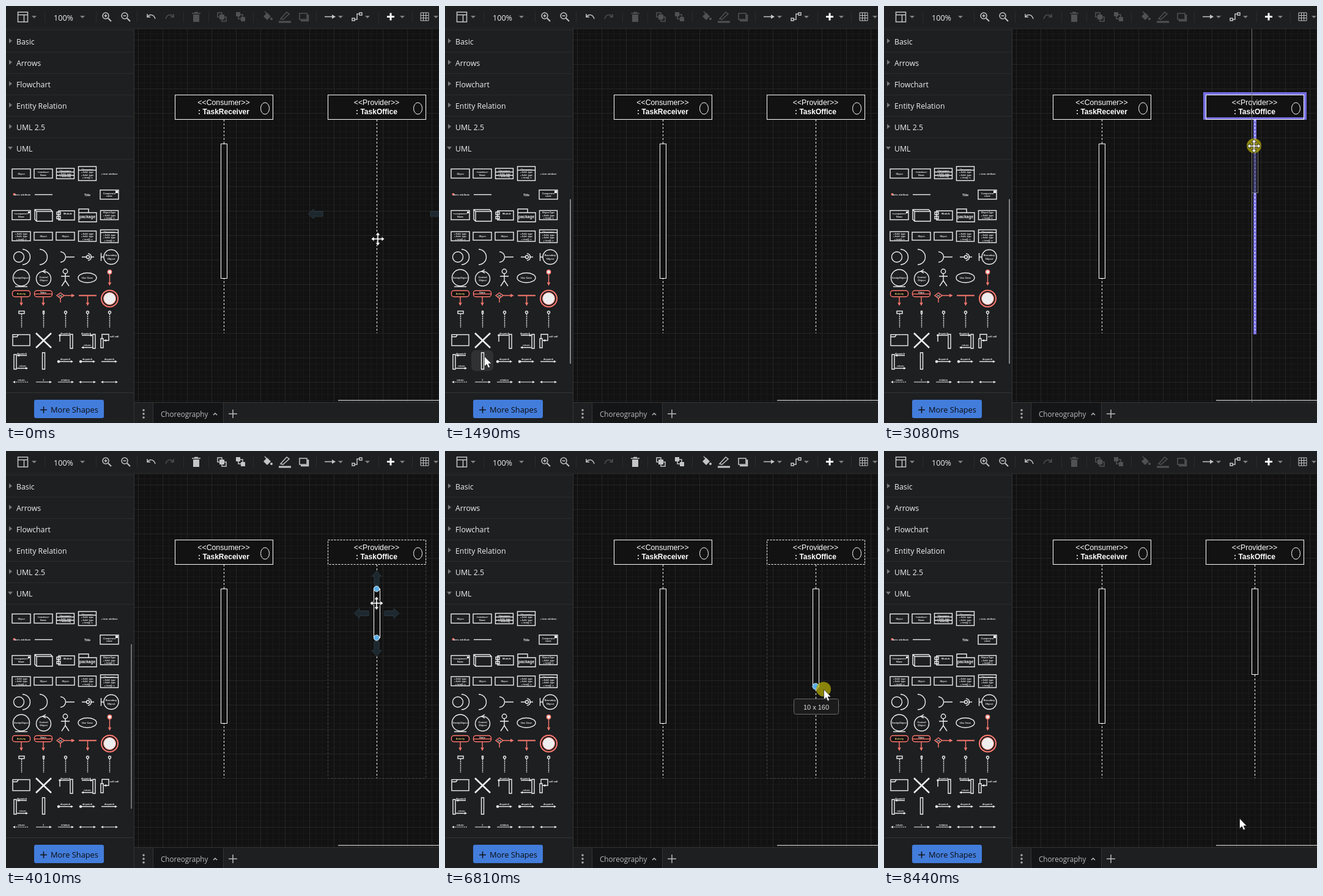
These frames come from a looping animation (708x682 px, 9.38 s). An HTML page:

```html
<!DOCTYPE html>
<html lang="en">
<head>
<meta charset="utf-8">
<style>
html, body { margin: 0; width: 100%; height: 100%; overflow: hidden; background: #121212; }
svg { display: block; }
text { font-family: "Open Sans", "Noto Sans", sans-serif; fill: #f0f0f0; }
.label { font: 12.3px "Liberation Sans", Arial, sans-serif; text-anchor: middle; fill: #fff; }
.tiny { font: bold 4px "Liberation Sans", Arial, sans-serif; text-anchor: middle; }
.icon { fill: none; stroke: #c4c5c6; stroke-width: 1.5; }
.solid { fill: #c4c5c6; stroke: none; }
.shape { fill: none; stroke: #eee; stroke-width: 1.4; }
.red { fill: none; stroke: #ff7a70; stroke-width: 1.4; }
.node { fill: #121212; stroke: #fff; }
</style>
</head>
<body>
<svg id="stage" width="708" height="682" viewBox="0 0 708 682"></svg>
<script>
const LOOP = 9380, STEP = 62;
const rect = (x, y, w, h, a = '') => `<rect x="${x}" y="${y}" width="${w}" height="${h}" ${a}/>`;
const path = (d, a = '') => `<path d="${d}" ${a}/>`;
const circle = (x, y, r, a = '') => `<circle cx="${x}" cy="${y}" r="${r}" ${a}/>`;
const text = (x, y, s, a = '') => `<text x="${x}" y="${y}" ${a}>${s.replace(/</g, '&lt;')}</text>`;
const tiny = (x, y, s, size = 4) => text(x, y, s, `class="tiny" style="font-size:${size}px"`);
const group = (content, a = '') => `<g ${a}>${content}</g>`;
const at = (x, y, content, a = '') => group(content, `transform="translate(${x} ${y})" ${a}`);

function grid() {
  let minor = '', major = '';
  for (let x = 216; x < 708; x += 10) {
    const d = `M${x}.5 37V648`;
    (x - 216) % 40 ? minor += d : major += d;
  }
  for (let y = 45; y < 648; y += 10) {
    const d = `M210 ${y}.5H708`;
    (y - 55) % 40 ? minor += d : major += d;
  }
  return path(minor, 'stroke="#191919"') + path(major, 'stroke="#252525"');
}

const lifeline = x => path(`M${x}.5 186V535`, 'stroke="#fff" stroke-dasharray="3 3"');

function participant(x, role, name, id) {
  const mid = x + 80;
  return rect(x + .5, 145.5, 160, 40, `id="${id}" class="node"`) +
    `<ellipse cx="${x + 147.5}" cy="167.5" rx="7" ry="9.5" fill="none" stroke="#fff"/>` +
    text(mid, 162, `<<${role}>>`, 'class="label"') +
    text(mid, 177, `: ${name}`, 'class="label" style="font-weight:bold;font-size:12px"');
}

const hoverArrow = (x, y, turn = 0) =>
  path('M-12 0L-3-8V-4H12V4H-3V8Z', `transform="translate(${x} ${y}) rotate(${turn})" fill="#1d282e" stroke="#2a3942"`);

function diagram() {
  const bar = (x, h, id) => rect(x + .5, 225.5, 10, h, `id="${id}" class="node"`);
  const highlight =
    rect(524, 143, 165, 41, 'fill="none" stroke="#756ee0" stroke-width="4"') +
    rect(604, 186, 5, 351, 'fill="#756ee0"') +
    rect(526.5, 145.5, 160, 40, 'fill="none" stroke="#fff"');
  return grid() +
    rect(526.5, 145.5, 160, 390, 'id="parent" fill="none" stroke="#4a4a4a" stroke-dasharray="3 3"') +
    participant(276, 'Consumer', 'TaskReceiver', 'left') +
    participant(526, 'Provider', 'TaskOffice', 'right') +
    group(highlight, 'id="highlight"') +
    lifeline(356) + lifeline(606) + bar(351, 220, 'fixedBar') + bar(601, 80, 'bar') +
    path('M601.5 37V648', 'id="guide" stroke="#777"') +
    rect(0, 225.5, 10, 80, 'id="ghost" fill="#121212" fill-opacity=".5" stroke="#7a7a7a"') +
    group(hoverArrow(506, 340) + hoverArrow(706, 340, 180), 'id="hover"') +
    '<g id="selection"></g>' +
    path('M543 645H708', 'stroke="#8a8a8a" stroke-width="2"');
}

function toolbar() {
  const caret = x => path(`M${x - 4} 16h8l-4 4z`, 'fill="#808183"');
  const lens = (x, mark) => at(x, 17, circle(-1, -1, 5) + path('M3 3L8 8', 'stroke-width="2"') + path(mark), 'class="icon"');
  const turn = 'M-6-4V1H-1M-6 1C-2-5 5-3 7 4';
  const front = rect(-7, -6, 7, 7) + rect(0, 1, 7, 7) + rect(-4, -3, 8, 8, 'class="solid"');
  const back = rect(-3, -3, 7, 7) + rect(-7, -7, 7, 7, 'class="solid"') + rect(1, 1, 7, 7, 'class="solid"');
  const editing =
    at(311, 18, rect(-5, -4, 10, 12, 'class="solid"') + path('M-7-6H7M-3-7.5H3')) +
    at(353, 17, front) + at(383, 17, back) +
    at(427, 17, path('M-6 0L0-6L6 0L0 6Z', 'class="solid"') + path('M-4-8L1-3') + circle(7, 4, 2, 'class="solid"')) +
    at(456, 17, path('M-7 4L3-7L7-4L-3 5Z') + path('M-10 9H10', 'stroke-width="3"')) +
    at(487, 17, rect(-7, -5, 12, 10) + path('M-5 7H7V-3', 'stroke-width="2.5"'));
  return rect(0, 0, 708, 37, 'fill="#1d1f21"') + path('M0 37H708', 'stroke="#2d2e30"') +
    path([63, 147, 214, 290, 331, 404, 507, 609, 664].map(x => `M${x}.5 9V27`).join(''), 'stroke="#2b2c2e"') +
    [46, 125, 547, 591, 648, 703].map(caret).join('') +
    group(rect(19.5, 10, 16, 16) + path('M19 14.5H36M29.5 14V26'), 'class="icon"') +
    text(78, 24, '100%', 'font-size="12.6"') +
    lens(164, 'M-3.5-1H1.5M-1-3.5V1.5') + lens(195, 'M-3.5-1H1.5') +
    at(237, 17, path(turn), 'class="icon"') +
    group(path(turn), 'class="icon" transform="translate(268 17) scale(-1 1)" opacity=".3"') +
    group(editing, 'id="editing" class="icon"') +
    group(path('M521 17.5H535') + path('M533 14L539 17.5L533 21Z', 'class="solid"') +
      path('M570 22H574V13H578') + rect(566, 20, 4, 4) + rect(578, 11, 4, 4), 'class="icon"') +
    path('M629 11.5V23.5M623 17.5H635', 'stroke="#fff" stroke-width="3"') +
    path('M678 11H691V24H678ZM682.5 11V24M686.7 11V24M678 15.5H691M678 19.7H691', 'class="icon" style="stroke-width:1"');
}

function palette() {
  const cols = [25, 61, 97, 133, 169];
  const box = (x, y, w, h, words = []) => rect(x - w / 2, y - h / 2, w, h, 'class="shape"') +
    words.map((s, i) => tiny(x, y + 1.5 + (i - (words.length - 1) / 2) * 4.5, s, 3.6)).join('');
  const draw = (d, a = 'class="shape"') => path(d, a);
  const head = (x, y, dir) => path(`M${x} ${y}l${-4 * dir}-2v4z`, 'fill="#eee"');
  const redDrop = (x, y) => draw(`M${x} ${y}V489m-2-4l2 4l2-4`, 'class="red"');
  const list = ['+ field: type', '+ field: type', '+ item(): x'];
  let s = '';

  s += box(25, 274, 30, 15, ['Object']) + box(61, 274, 30, 15, ['«interface»', 'Name']) +
    box(97, 274, 29, 17, ['Classname', '+ field: type', '+ method()']) + draw('M83 271.5H112M83 277H112') +
    box(133, 274, 29, 23, ['Classname', ...list]) + draw('M119 268.5H148') + tiny(169, 275.5, '+ item: attribute', 3.6);

  s += circle(13.5, 308, 2, 'fill="#ff7a70"') + tiny(27, 309.5, 'item: attribute') + draw('M47 308.5H76') +
    tiny(133, 310.5, 'Title', 5) + box(169, 308.5, 30, 15, ['Component', 'name']) + rect(179, 302, 4, 4, 'fill="#eee"');

  s += box(25, 342, 30, 15, ['«component»', 'Name']) + rect(36, 336, 3, 3, 'fill="#eee"') +
    draw('M47 333H73L76 336V352H50L47 349ZM50 352V336H76M47 333L50 336') +
    draw('M86 335H112V350H86ZM83 337H89V341H83ZM83 344H89V348H83Z') + tiny(101, 341, 'Module') +
    draw('M119 338V332H135V338M119 338H148V353H119Z') + tiny(133, 347, 'package', 6.5) +
    box(169, 342, 29, 15, ['Object:Type', ...list.slice(1)]);

  s += box(25, 376.5, 30, 15, list) + box(61, 376.5, 30, 13, ['Object']) + box(97, 376.5, 30, 13, ['Object']) +
    box(133, 376.5, 29, 17, list) + box(169, 376.5, 29, 21, ['Classname', ...list]) + draw('M155 370.5H184');

  s += circle(21, 410.5, 8.5, 'class="shape"') + draw('M27 398A12.5 12.5 0 0 1 27 423') +
    draw('M55 398A12.5 12.5 0 0 1 55 423') + draw('M89 402A8.5 8.5 0 0 1 89 419M97.5 410.5H112') +
    draw('M124 410.5H131M138 410.5H144M134 405A5.5 5.5 0 0 1 134 416') + circle(134, 410.5, 2.5, 'class="shape"') +
    circle(172, 410.5, 12, 'class="shape"') + draw('M155.5 404V417M155 410.5H160') + tiny(172, 409, 'Boundary') + tiny(172, 414.5, 'Object');

  s += circle(25, 444.5, 13.5, 'class="shape"') + draw('M15 459H35') + tiny(25, 446, 'EntityObject') +
    circle(61.5, 446, 12, 'class="shape"') + draw('M65 431L60 434L65 437') + tiny(61.5, 445, 'Control') + tiny(61.5, 450, 'Object') +
    circle(97, 434, 3.7, 'class="shape"') + draw('M97 438V449M90 442H104M97 449L91 458M97 449L103 458') +
    '<ellipse cx="133" cy="444.5" rx="15" ry="8" class="shape"/>' + tiny(133, 446, 'Use Case') +
    circle(169.5, 435, 3.2, 'class="red" style="fill:#eee"') + draw('M169.5 438V456m-2-4l2 4l2-4', 'class="red"');

  s += [25, 61].map(x => rect(x - 14.5, 465.5, 29, 10, 'rx="4" class="red" style="fill:#111"') + redDrop(x, 475)).join('') +
    text(25, 472, 'Activity', 'class="tiny" style="fill:#e8d870"') + tiny(61, 470, 'State') + draw('M46 471H76', 'class="red"') +
    draw('M83 473.5L89 469L95 473.5L89 478ZM95 473.5H111m-4-2l4 2l-4 2', 'class="red"') + draw('M89 478V485', 'class="red"') + tiny(89, 474.5, '[x]') +
    draw('M119 473.5H148', 'class="red" style="stroke-width:2"') + redDrop(133.5, 474) +
    circle(169.5, 478.5, 13.5, 'class="red" style="stroke-width:2"') + circle(169.5, 478.5, 10, 'fill="#eee" stroke="#ff7a70"');

  s += cols.map((x, i) => draw(`M${x + .5} 504V526`, 'class="shape" stroke-dasharray="2 1"') +
    (i > 1 ? circle(x + .5, 501, 2, 'class="shape"') : rect(x - (i ? .5 : 4), 499, i ? 2 : 9, 4, 'class="shape"'))).join('');

  s += box(25, 546.5, 28, 18) + draw('M11 541H18L20 538') +
    draw('M49 535L74 559M74 535L49 559', 'class="shape" style="stroke-width:2.6"') +
    draw('M105 537H109V560H105ZM88 538.5H104M88 538V549') + circle(88, 538.5, 1.7, 'fill="#eee"') + tiny(97, 536.5, 'dispatch') +
    draw('M142 537H146V560H142ZM124 538.5H141M126 558.5H141') + head(142, 538.5, 1) + head(123, 558.5, -1) + tiny(131, 536.5, 'dispatch') + tiny(133, 556, 'return') +
    draw('M155 544H159V559H155ZM157 544V537H168V547H160') + head(160, 547, -1) + tiny(177, 542, 'self call');

  s += draw('M13 570H17V594H13ZM18 571.5H34M18 592.5H34') + head(18, 571.5, -1) + head(36, 592.5, 1) + tiny(26, 569.5, 'dispatch') + tiny(27, 590, 'return') +
    draw('M59.5 567H63.5V594H59.5Z');
  s += cols.slice(2).map((x, i) => draw(`M${x - 13} 581.5H${x + 10}`) + head(x + 13, 581.5, 1) +
    (i < 2 ? circle(x - 11, 581.5, 2.2, 'fill="#eee"') : '') + tiny(x, 579, 'dispatch')).join('');
  s += cols.map((x, i) => draw(`M${x - 12} 615H${x + 12}`, `class="shape" style="stroke-width:1" ${i ? '' : 'stroke-dasharray="2 1"'}`) +
    (i ? head(x + 14, 615, 1) : '') + (i === 0 || i > 2 ? head(x - 14, 615, -1) : '') + (i < 3 ? tiny(x, 613, ['return', '1', 'relation'][i]) : '')).join('');
  return s;
}

function sidebar() {
  const names = ['Basic', 'Arrows', 'Flowchart', 'Entity Relation', 'UML 2.5', 'UML'];
  const rows = names.map((name, i) => {
    const y = Math.round(62.5 + i * 35.1);
    const mark = i < 5 ? `M5 ${y - 10}l5 4l-5 4z` : `M3 ${y - 8}h8l-4 5z`;
    return path(mark, 'fill="#77797b"') + text(17, y, name, 'font-size="12.3"') + path(`M0 ${y + 12}.5H209`, 'stroke="#2b2c2e"');
  }).join('');
  return rect(0, 37, 209, 645, 'fill="#1d1f21"') + path('M0 39.5H209', 'stroke="#2b2c2e"') + rows +
    rect(43, 563, 36, 34, 'id="itemHover" rx="7" fill="#303132"') + palette() +
    rect(204, 316, 2, 269, 'id="scrollbar" fill="#858585"') +
    path('M0 632.5H209M209.5 37V682', 'stroke="#343537"') +
    rect(46, 644, 114, 30, 'rx="3" fill="#437ddc"') +
    path('M61.5 655V666M56 660.5H67', 'stroke="#111" stroke-width="1.5"') +
    text(73, 665, 'More Shapes', 'font-size="12.8" style="fill:#0c0c0c"');
}

const tabs = () => rect(210, 648, 498, 34, 'fill="#1d1f21"') + path('M210 648.5H708', 'stroke="#343537"') +
  rect(240.5, 648.5, 115, 34, 'fill="#141516" stroke="#343537"') +
  [661, 667, 673].map(y => circle(225, y, 1.8, 'fill="#aaa"')).join('') +
  text(253, 672, 'Choreography', 'font-size="11.7" style="fill:#bbb"') +
  path('M339 669L342 666L345 669', 'fill="none" stroke="#bbb" stroke-width="1.5"') +
  path('M371 660V674M364 667H378', 'stroke="#bbb" stroke-width="1.5"');

const popup = () => group(rect(215.5, 520.5, 80, 156, 'rx="3" fill="#1b1c1d" stroke="#3a3b3c"') +
  rect(250.5, 541.5, 10, 80, 'class="node"') +
  text(255.5, 660, 'Activation', 'class="label" style="font-size:11px"'), 'id="popup"');

const resizeLabel = () => group(rect(570.5, .5, 73, 25, 'rx="3" fill="#1b1b1b" stroke="#6a6a6a"') +
  text(607, 18, '', 'id="size" class="label" style="font-size:11px;fill:#ddd"'), 'id="sizeBox"');

const pointer = () => group(circle(0, -.5, 12, 'id="press" fill="#b2aa08" fill-opacity=".75"') +
  path('M.5 0V16.5L4.3 13L6.8 18.8L9.5 17.6L7 12H12Z', 'id="arrow" fill="#fff" stroke="#222" stroke-width=".7"') +
  path('M0-11L4-6H1.2V-1.2H6V-4L11 0L6 4V1.2H1.2V6H4L0 11L-4 6H-1.2V1.2H-6V4L-11 0L-6-4V-1.2H-1.2V-6H-4Z',
    'id="cross" fill="#fff" stroke="#111" stroke-width=".8"'), 'id="pointer"');

stage.innerHTML = diagram() + toolbar() + tabs() + sidebar() + popup() + resizeLabel() + pointer();
const $ = id => document.getElementById(id);
const set = (id, attrs) => Object.entries(attrs).forEach(([key, value]) => $(id).setAttribute(key, value));
const show = (id, on) => { $(id).style.display = on ? '' : 'none'; };

// time, x, y; a trailing 1 eases the move that starts there
const mouse = [
  [0, 608, 381], [550, 608, 381, 1], [1490, 64, 573], [2000, 64, 573], [2370, 541, 359], [2430, 559, 338],
  [2920, 605, 235], [3080, 605, 229], [3330, 605, 224], [3700, 605, 224, 1], [4560, 608, 308], [4750, 608, 308],
  [5010, 614, 342], [5330, 617, 368], [5530, 617, 368], [5740, 618, 379], [6070, 618, 379], [6080, 619, 386],
  [6800, 619, 386], [6810, 619, 390], [6870, 619, 386], [7070, 619, 382, 1], [7950, 581, 605], [8010, 581, 605],
  [8440, 581, 601], [LOOP, 581, 601]
];
const heights = [[0, 80], [4880, 90], [5000, 100], [5080, 110], [5150, 120], [5220, 130], [5330, 140], [5600, 150], [6080, 160], [6870, 150], [7070, 140]];

function mouseAt(t) {
  const i = Math.max(0, mouse.findLastIndex(k => k[0] <= t));
  const a = mouse[i], b = mouse[i + 1] || a;
  let u = Math.min(1, Math.floor((t - a[0]) / STEP + .02) * STEP / (b[0] - a[0] || 1));
  if (a[3]) u = u * u * (3 - 2 * u);
  return [a[1] + (b[1] - a[1]) * u, a[2] + (b[2] - a[2]) * u];
}

function selection(h) {
  const mid = 225.5 + h / 2, end = 225.5 + h;
  const handle = (x, y) => circle(x, y, 4.5, 'fill="#5aaee8" stroke="#e8f4fc"');
  return hoverArrow(581, mid) + hoverArrow(631, mid, 180) + hoverArrow(606, 208, 90) + hoverArrow(606, end + 18, -90) +
    handle(606, 225.5) + handle(606, end);
}

function render(t) {
  const [x, y] = mouseAt(t);
  const within = (from, to) => t >= from && t < to;
  const h = heights.findLast(k => k[0] <= t)[1];
  const dragging = within(2000, 3700), resizing = within(4750, 7070), selected = within(3700, 8200);
  const cross = (t < 1000 && x > 526) || within(2700, 4500);

  set('pointer', { transform: `translate(${x.toFixed(1)} ${y.toFixed(1)})` });
  show('arrow', !cross);
  show('cross', cross);
  show('press', dragging || resizing || within(8070, 8370));
  show('hover', t < 1000 && x > 526);
  show('itemHover', within(1300, 2060) && x < 90);
  show('scrollbar', x < 210 || within(2000, 5330));
  set('scrollbar', { opacity: t < 3700 ? 1 : Math.max(.2, 1 - (t - 3700) / 1500) });
  show('popup', within(1680, 2000));

  const [gx, gy] = mouseAt(t - 60);
  const snap = (v, origin) => origin + Math.round((v - 4 - origin) / 10) * 10;
  show('ghost', dragging);
  set('ghost', { x: t < 2700 ? Math.round(gx) - 4.5 : 601.5, y: snap(gy, 225) + .5 });
  show('highlight', dragging && x > 526);
  show('guide', within(2800, 3700));

  show('bar', t >= 3700);
  set('bar', { height: h });
  show('parent', selected);
  set('right', { 'stroke-dasharray': selected ? '3 2' : 'none' });
  set('editing', { opacity: selected ? 1 : .3 });
  $('selection').innerHTML = !selected ? '' : resizing
    ? circle(606, 225 + h, 5, 'fill="#5aaee8" stroke="#cfe8f8"') : selection(h);
  show('sizeBox', resizing);
  set('sizeBox', { transform: `translate(0 ${245 + h})` });
  $('size').textContent = `10 x ${h}`;
}

function tick() {
  render(performance.now() % LOOP);
  requestAnimationFrame(tick);
}
tick();
</script>
</body>
</html>
```
